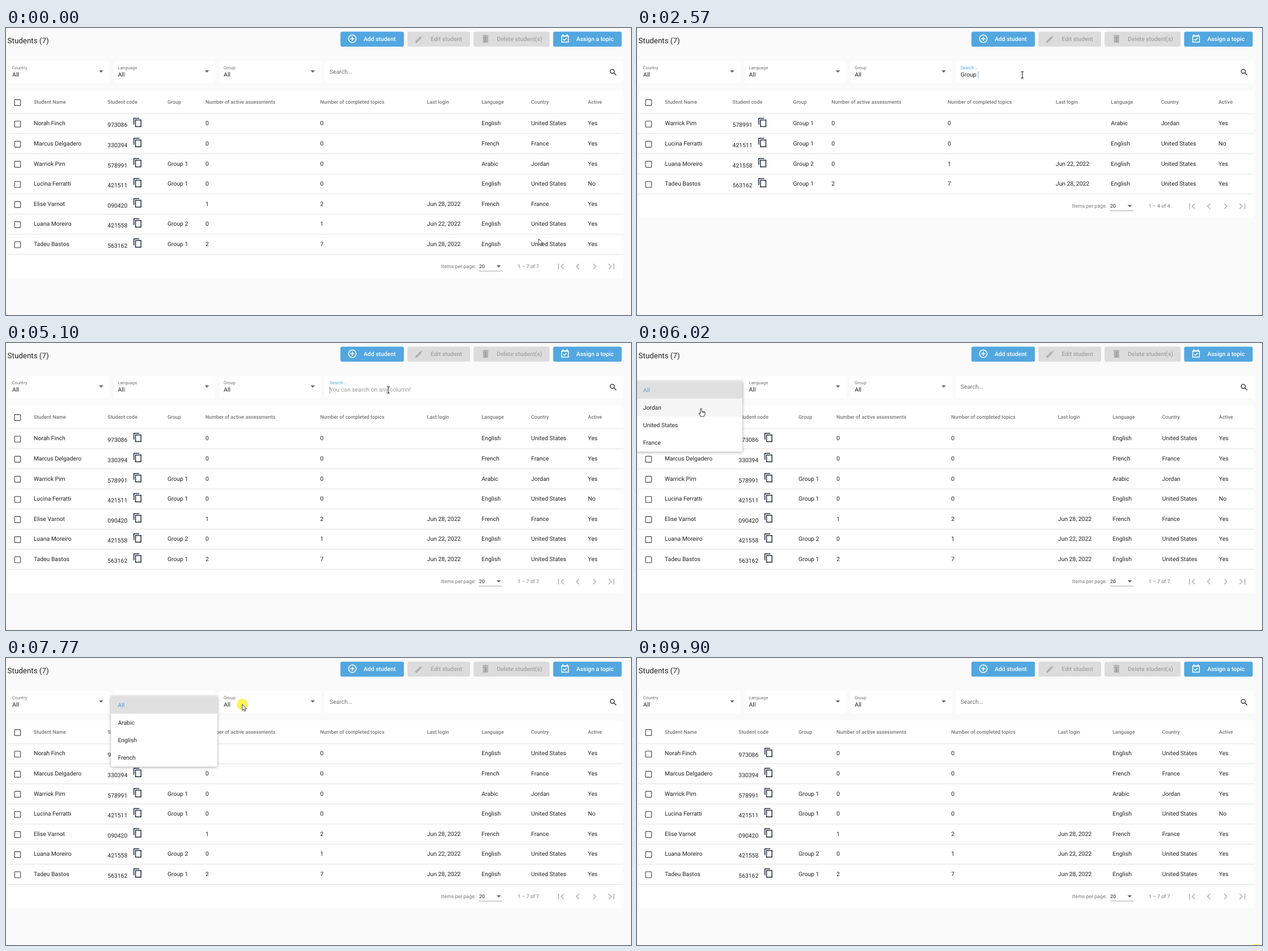
These frames come from a looping animation (1103 by 508 pixels, 9960 ms). An HTML page:

```html
<!DOCTYPE html>
<html lang="en">
<head>
<meta charset="utf-8">
<title>Students</title>
<style>
  html, body { margin: 0; width: 100%; height: 100%; overflow: hidden; background: #fafafa; }
  svg { display: block; width: 1103px; height: 508px; }
  text { font: 400 10.39px Roboto, sans-serif; fill: #212121; white-space: pre; text-rendering: geometricPrecision; }
  .title { font-size: 13.36px; }
  .head { font-size: 8.9px; font-weight: 500; fill: #757575; }
  .small { font-size: 8.9px; fill: #757575; }
  .label { font-size: 7.79px; fill: #757575; }
  .btn { font-weight: 500; }
  .panel { filter: drop-shadow(0 1.5px 2.5px rgba(0,0,0,.36)); }
</style>
</head>
<body>
<svg viewBox="0 0 1103 508">
  <g id="base"></g>
  <g id="search"></g>
  <g id="table"></g>
  <g id="panel" class="panel"></g>
  <circle id="glow" r="10" fill="#fff23c" fill-opacity=".84"/>
  <g id="cursor"></g>
</svg>
<script>
const LOOP = 9960, BLUE = '#52a7e0', RIGHT = 1089.2;
const $ = id => document.getElementById(id);

// Icons are strokes, 2 units wide on a 24 unit grid
const ICONS = {
  add: 'M12 7v10M7 12h10M3 12a9 9 0 0 1 18 0a9 9 0 0 1-18 0',
  edit: 'M4 20v-2L14 8l2 2L6 20zM17 6l2 2',
  bin: 'M7 8h10v12H7zM5 5h14M10 4h4M10 8v12M12 8v12M14 8v12',
  event: 'M4 6h16v14H4zM4 5h16M7 1v4M17 1v4M8 13l2.6 2.6 5.2-5.2',
  copy: 'M3 17V2h13M7 6h13v16H7z',
  find: 'M4 9.5a5.5 5.5 0 0 1 11 0a5.5 5.5 0 0 1-11 0M14 14l6 6',
  chevron: 'M14.7 6.7L9.4 12l5.3 5.3',
  edge: 'M17.7 6.7L12.4 12l5.3 5.3M7 6v12'
};

const POINTERS = {
  arrow: '<path d="M0 0V11L2.5 8.7 4.1 12.4 5.9 11.6 4.3 8H7.6Z" fill="#fff" stroke="#111" stroke-width=".8"/>',
  hand: '<path d="M-1 5V0H1V5L7 6V10L5 14H-1L-4 8-1 9ZM3 5V8M5 6V8" fill="#fff" stroke="#111" stroke-width=".8" stroke-linejoin="round"/>',
  beam: '<path d="M-2.4-5.6H2.4M0-5.6V5.6M-2.4 5.6H2.4" fill="none" stroke="#111"/>'
};

const HEADS = ['Student Name', 'Student code', 'Group', 'Number of active assessments',
  'Number of completed topics', 'Last login', 'Language', 'Country', 'Active'];
const COLS = [49, 179.3, 285, 352, 554.5, 743, 839.3, 926.8, 1027];
const ROWS = [
  'Norah Finch|973086||0|0||English|United States|Yes',
  'Marcus Delgadero|330394||0|0||French|France|Yes',
  'Warrick Pim|578991|Group 1|0|0||Arabic|Jordan|Yes',
  'Lucina Ferratti|421511|Group 1|0|0||English|United States|No',
  'Elise Varnot|090420||1|2|Jun 28, 2022|French|France|Yes',
  'Luana Moreiro|421558|Group 2|0|1|Jun 22, 2022|English|United States|Yes',
  'Tadeu Bastos|563162|Group 1|2|7|Jun 28, 2022|English|United States|Yes'
];

const SELECTS = [
  { name: 'Country', items: ['All', 'Jordan', 'United States', 'France'], open: 5720, close: 6750 },
  { name: 'Language', items: ['All', 'Arabic', 'English', 'French'], open: 7040, close: 7850 },
  { name: 'Group', items: ['All', 'Group 1', 'Group 2', 'Group 3'], open: 8070, close: 9560 }
].map((s, i) => ({ ...s, x: 3 + 186.7 * i }));
const OPT_TOP = 67.6, OPT_H = 31.16, PANEL_W = 187.2;

const QUERY = 'Group 1', KEYS = [1370, 1560, 1690, 1820, 2020, 2570, 2770];
const FOCUS = 840, PICK = 4430, CLEAR = 5030, BLUR = 5640;
const CLICKS = [FOCUS, BLUR, 6700, 7040, 7770, 8050, 9900];
// Pointer moves: arrival time, duration, x, y
const MOVES = [
  [0, 0, 940, 373], [780, 700, 680, 83], [5620, 550, 118, 82], [6020, 220, 113, 116],
  [6350, 330, 106, 174], [6700, 350, 250, 82], [7450, 350, 232, 173], [7720, 270, 417, 82],
  [8400, 300, 412, 172], [8620, 220, 507, 59], [8890, 270, 1036, 516], [9280, 160, 1058, 478],
  [9420, 140, 1092, 516]
];

const clamp = v => Math.min(1, Math.max(0, v));
const ramp = (t, a, b) => clamp((t - a) / (b - a));
const ease = v => v * v * (3 - 2 * v);

const rect = (x, y, w, h, fill, r = 0) => `<rect x="${x}" y="${y}" width="${w}" height="${h}" rx="${r}" fill="${fill}"/>`;
const text = (x, y, s, attr = '') => `<text x="${x}" y="${y}" ${attr}>${s}</text>`;
const icon = (name, cx, cy, ink, size = 17.8, flip = 1) =>
  `<path d="${ICONS[name]}" fill="none" stroke="${ink}" stroke-width="2"
    transform="translate(${cx} ${cy}) scale(${flip * size / 24} ${size / 24}) translate(-12 -12)"/>`;
const caretDown = (x, y) => `<path d="M${x - 3.8} ${y}h7.6l-3.8 3.9z" fill="#666"/>`;
const box = y => `<rect x="15.1" y="${y - 5.2}" width="10.5" height="10.5" rx="1" fill="none" stroke="#5f5f5f" stroke-width="1.4"/>`;

const pen = document.createElement('canvas').getContext('2d');
function textWidth(s) {
  pen.font = '100px Roboto, sans-serif';
  return pen.measureText(s).width * .1039;
}

function drawBase() {
  let x = 590.2;
  const button = ([s, w, name, on]) => {
    const ink = on ? '#fff' : '#a3a3a3';
    const out = rect(x, 6.4, w, 26.7, on ? BLUE : '#dcdcdc', 3) + icon(name, x + 21, 19, ink) +
      text(x + 41, 22.9, s, `class="btn" style="fill:${ink}"`);
    x += w + 6.2;
    return out;
  };
  $('base').innerHTML = rect(0, 0, 1103, 508, '#fafafa') + text(2.6, 27.3, 'Students (7)', 'class="title"') +
    [['Add student', 112, 'add', 1], ['Edit student', 110.6, 'edit', 0],
      ['Delete student(s)', 134.2, 'bin', 0], ['Assign a topic', 121, 'event', 1]].map(button).join('') +
    SELECTS.map((s, i) => rect(s.x, 58, 179.4, 39.2, '#fff', 3) +
      text(s.x + 7.5, 72.5, s.name, `class="label" id="label${i}"`) +
      text(s.x + 7.9, 86.3, 'All') + caretDown(s.x + 164.9, 75.1)).join('') +
    rect(562.8, 58, RIGHT - 562.8, 39.2, '#fff', 3) + icon('find', 1071.6, 78.3, '#222', 15.8);
}

function drawTable(query) {
  const shown = ROWS.filter(r => r.toLowerCase().includes(query.trim().toLowerCase()));
  // Without the longest name, the other columns spread to the left
  const slack = shown.includes(ROWS[1]) ? 0 : .0118;
  const cols = COLS.map((x, i) => i ? x - slack * (RIGHT - x) : x + slack * 30);
  const n = shown.length, rowH = 35.58, end = 151.9 + n * rowH, mid = end + 21.1;
  const line = y => rect(3, y - .8, RIGHT - 3, .9, '#dedede');
  let out = rect(3, 110.6, RIGHT - 3, end - 69.1, '#fff', 3) + box(131.9) + line(152.2);
  HEADS.forEach((h, i) => out += text(cols[i], 134.4, h, 'class="head"'));
  shown.forEach((row, k) => {
    const c = 151.9 + (k + .5) * rowH;
    out += box(c + .4) + line(c + rowH / 2) + icon('copy', cols[1] + 53, c - 2.5, '#1f2a3d');
    row.split('|').forEach((s, i) => out += text(cols[i], c + (i === 1 ? 5.7 : 2.8), s));
  });
  out += text(829, mid + 3, 'Items per page:', 'class="small" text-anchor="end"') +
    text(835, mid + 3, '20', 'class="small" style="fill:#212121"') +
    caretDown(869.6, mid - 2) + rect(835, mid + 7.7, 41, .8, '#8c8c8c') +
    text(903, mid + 2.8, `1 – ${n} of ${n}`, 'class="small"');
  ['edge', 'chevron', 'chevron', 'edge'].forEach((name, i) =>
    out += icon(name, 979.4 + i * 29.68, mid + .2, '#b9b9b9', 20.8, i < 2 ? 1 : -1));
  $('table').innerHTML = out;
}

const typedAt = t => t < CLEAR ? QUERY.slice(0, KEYS.filter(k => k <= t).length) : '';

function caretOn(t) {
  if (t < FOCUS || t >= BLUR || (t >= PICK && t < CLEAR)) return false;
  const last = Math.max(...[FOCUS, ...KEYS, CLEAR].filter(k => k <= t));
  return Math.floor((t - last) / 530) % 2 === 0;
}

function drawSearch(t) {
  const typed = typedAt(t), x = 571, w = textWidth(typed);
  const focus = ease(ramp(t, 780, 1060)) * (1 - ease(ramp(t, BLUR, BLUR + 200)));
  const picked = t >= PICK && t < CLEAR;
  let out = `<g transform="translate(${x} ${80.8 - 8.3 * focus}) scale(${1 - .25 * focus})">` +
    text(0, 0, 'Search...', `style="fill:${focus > .3 ? BLUE : '#707070'}"`) + '</g>';
  if (picked) out += rect(x, 77, w, 12, '#0078d7');
  out += typed ? text(x, 86.3, typed, picked ? 'style="fill:#fff"' : '')
    : text(x, 86.3, 'You can search on any column!', `style="fill:#999" opacity="${clamp(focus * 1.6 - .6)}"`);
  if (caretOn(t)) out += rect(x + w - .1, 77, .9, 12, BLUE);
  $('search').innerHTML = out;
}

function pointAt(t) {
  let x = 0, y = 0;
  for (const [end, time, nx, ny] of MOVES) {
    const k = time ? ease(ramp(t, end - time, end)) : 1;
    x += (nx - x) * k;
    y += (ny - y) * k;
  }
  return [x, y];
}

function drawPanel(t, x, y) {
  const sel = SELECTS.find(s => t >= s.open && t < s.close + 100);
  SELECTS.forEach((s, i) => $('label' + i).style.fill = s === sel ? BLUE : '');
  const g = $('panel');
  if (!sel) { g.innerHTML = ''; return null; }
  const left = sel.x - 4.2, rise = ease(ramp(t, sel.open, sel.open + 120));
  const over = x >= left && x <= left + PANEL_W ? Math.floor((y - OPT_TOP) / OPT_H) : -1;
  g.innerHTML = rect(left, OPT_TOP, PANEL_W, OPT_H * 4, '#fff', 3) + sel.items.map((s, i) => {
    const top = OPT_TOP + i * OPT_H;
    const fill = i === 0 ? '#e0e0e0' : i === over ? '#f5f5f5' : '#fff';
    return rect(left, top, PANEL_W, OPT_H, fill, i % 3 ? 0 : 2.5) +
      text(left + 11.9, top + 18.9, s, i ? '' : 'style="fill:#5b9dca"');
  }).join('');
  g.setAttribute('opacity', rise * (1 - ramp(t, sel.close, sel.close + 100)));
  g.setAttribute('transform', `translate(0 ${OPT_TOP * .2 * (1 - rise)}) scale(1 ${.8 + .2 * rise})`);
  return { hit: over >= 0 && over < 4 };
}

function pointerKind(panel, x, y) {
  if (panel) return panel.hit ? 'hand' : 'arrow';
  if (y < 58 || y > 97) return 'arrow';
  if (x > 562 && x < 1055) return 'beam';
  return SELECTS.some(s => x > s.x && x < s.x + 179) ? 'hand' : 'arrow';
}

let lastQuery = null, lastKind = null;
function render(t) {
  const query = typedAt(t - 60);
  if (query !== lastQuery) drawTable(lastQuery = query);
  drawSearch(t);
  const [x, y] = pointAt(t);
  const kind = pointerKind(drawPanel(t, x, y), x, y);
  if (kind !== lastKind) $('cursor').innerHTML = POINTERS[lastKind = kind];
  for (const id of ['cursor', 'glow']) $(id).setAttribute('transform', `translate(${x} ${y})`);
  $('glow').setAttribute('visibility', CLICKS.some(c => t >= c && t < c + 140) ? 'visible' : 'hidden');
}

drawBase();
const start = performance.now();
function tick() {
  render((performance.now() - start) % LOOP);
  requestAnimationFrame(tick);
}
tick();
</script>
</body>
</html>
```
